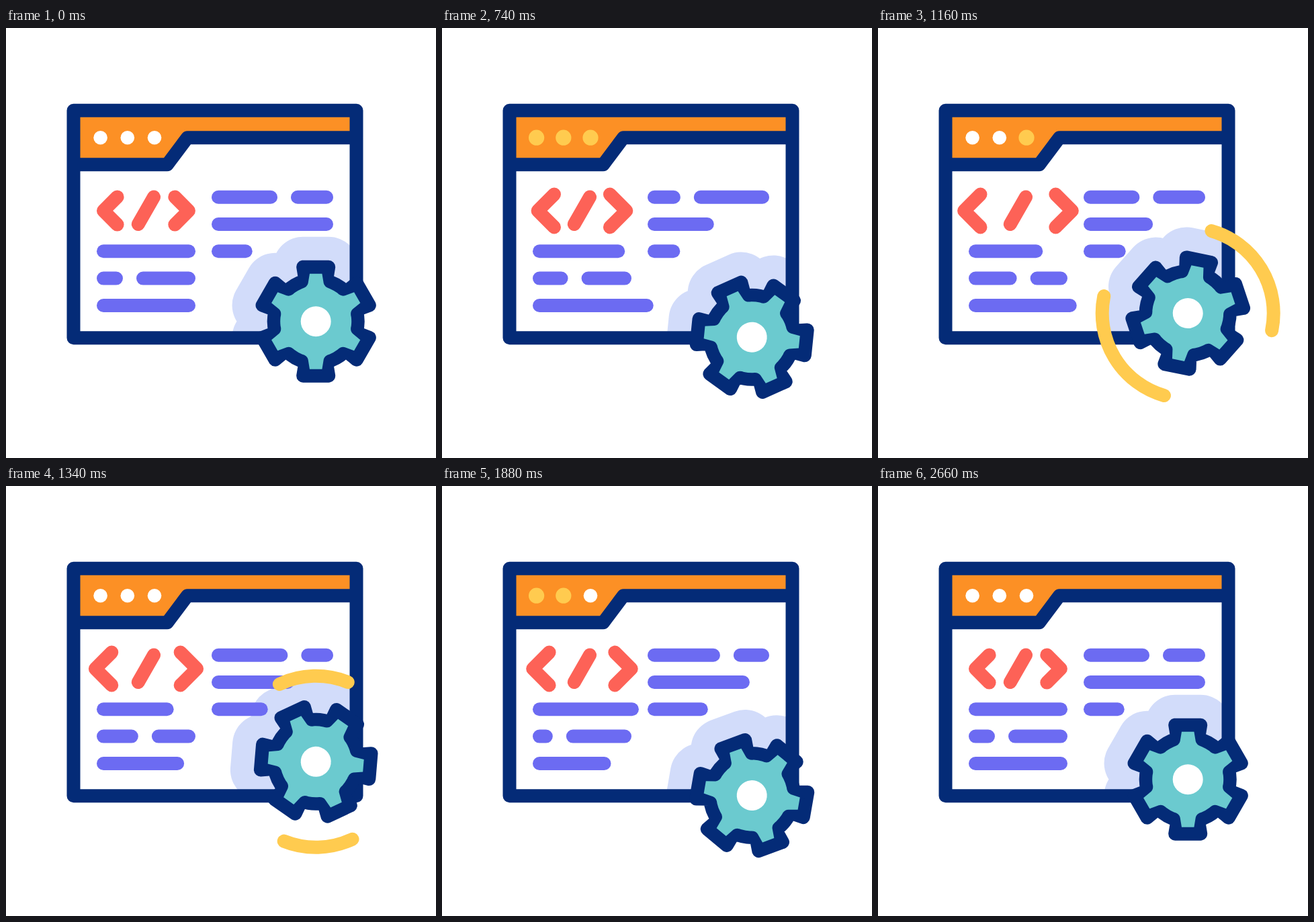
An HTML page for the animation above (3 s loop, 640 px wide and 640 px high).

```html
<!DOCTYPE html>
<html lang="en">
<head>
<meta charset="utf-8">
<title>Code window with gear</title>
<style>
  html, body { margin: 0; width: 100%; height: 100%; overflow: hidden; background: #fff; }
  svg { display: block; width: 100%; height: 100%; }
  .line { fill: none; stroke-width: 20; stroke-linecap: round; stroke-linejoin: round; }
  .navy { stroke: #042b77; }
  .bar { stroke: #6c6bf2; }
  .red { stroke: #fd6257; }
  .yellow { stroke: #ffcb4f; }
</style>
</head>
<body>
<svg viewBox="0 0 640 640">
  <defs>
    <clipPath id="inside"><rect x="105" y="128" width="411" height="328"/></clipPath>
    <path id="body"/>
  </defs>
  <g clip-path="url(#inside)">
    <use id="shadow" href="#body" fill="#d2dcfa" stroke="#d2dcfa" stroke-width="90" stroke-linejoin="round"/>
  </g>
  <path d="M100 123H522V163H270L240 203H100Z" fill="#fc9025"/>
  <path class="line navy" d="M100.5 122.7H521.5V461.2H100.5ZM100.5 203.2H240L270 163.2H521.5"/>
  <g id="dots"></g>
  <path class="line red" d="M220 251.5L196.8 292"/>
  <path class="line red" id="left"/>
  <path class="line red" id="right"/>
  <g id="bars"></g>
  <g id="gear">
    <path class="line yellow" id="arcs"/>
    <use href="#body" class="line navy" style="fill:#042b77"/>
    <path id="face" fill="#6bcacf"/>
    <circle r="22.5" fill="#fff"/>
  </g>
</svg>
<script>
const LOOP = 3000;
const byId = id => document.getElementById(id);
const clamp = x => Math.max(0, Math.min(1, x));
const sine = x => (1 - Math.cos(Math.PI * x)) / 2;

function add(parent, tag, attrs) {
  const el = document.createElementNS('http://www.w3.org/2000/svg', tag);
  for (const name in attrs) el.setAttribute(name, attrs[name]);
  return byId(parent).appendChild(el);
}

// Polar point, clockwise degrees from straight up
function polar(r, deg) {
  const a = deg * Math.PI / 180;
  return `${(r * Math.sin(a)).toFixed(2)} ${(-r * Math.cos(a)).toFixed(2)}`;
}

// Runs through [time, value] keys; blend shapes each step
function track(keys, t, blend) {
  const last = keys.length - 1;
  if (t <= keys[0][0]) return keys[0][1];
  if (t >= keys[last][0]) return keys[last][1];
  const i = keys.findIndex(key => key[0] > t) - 1;
  const [t0, v0] = keys[i], [t1, v1] = keys[i + 1];
  return blend(v0, v1, (t - t0) / (t1 - t0), i, t1 - t0);
}

const eased = (keys, t) => track(keys, t, (a, b, x) => a + (b - a) * sine(x));

// Flowing curve through the keys, at rest on both ends
function flowing(keys, t) {
  const slope = k => k === 0 || k === keys.length - 1 ? 0
    : (keys[k + 1][1] - keys[k - 1][1]) / (keys[k + 1][0] - keys[k - 1][0]);
  return track(keys, t, (a, b, x, i, span) => a + (b - a) * x * x * (3 - 2 * x)
    + span * x * (1 - x) * (slope(i) * (1 - x) - slope(i + 1) * x));
}

// Six-fold ring: one tooth path per 60 degrees, joined by arcs
function ring(r, tooth) {
  let d = '';
  for (let a = 0; a < 360; a += 60) {
    d += (a ? `A${r} ${r} 0 0 1 ` : 'M') + tooth((radius, deg) => polar(radius, a + deg));
  }
  return `${d}A${r} ${r} 0 0 1 ${d.slice(1).split(/[LQ]/)[0]}Z`;
}

byId('body').setAttribute('d', ring(62.5, p =>
  `${p(62.5, -14.5)}L${p(83.2, -13.2)}L${p(83.2, 13.2)}L${p(62.5, 14.5)}`));
byId('face').setAttribute('d', ring(53, p =>
  `${p(53, -23)}Q${p(52.5, -14)} ${p(58, -11.5)}L${p(71.6, -7.4)}`
  + `L${p(71.6, 7.4)}L${p(58, 11.5)}Q${p(52.5, 14)} ${p(53, 23)}`));

// Every bar end swings to one side, then the other, then rests
const rows = [
  { x: 316, y: 251.8, end: 394, swing: [-52, 26], start: 180, step: 660, far: 477 },
  { x: 316, y: 292, end: 477, swing: [-93, -41], start: 180, step: 720 },
  { x: 316, y: 332.2, end: 356.7, swing: [-14, 41], start: 180, step: 720 },
  { x: 145, y: 332.2, end: 272, swing: [-37, 11], start: 500, step: 700 },
  { x: 145, y: 372.6, end: 164, swing: [33, -9.5], start: 440, step: 680, far: 272 },
  { x: 145, y: 413, end: 272, swing: [37, -43], start: 180, step: 720 }
];
for (const row of rows) {
  row.el = add('bars', 'path', { class: 'line bar' });
  row.keys = [0, ...row.swing, 0].map((v, i) => [row.start + i * row.step, row.end + v]);
}

const dots = [0, 1, 2].map(i => {
  const place = { cx: 140.6 + i * 40.2, cy: 163.2 };
  add('dots', 'circle', { ...place, r: 10.3, fill: '#fff' });
  return add('dots', 'circle', { ...place, r: 11.6, fill: '#ffcb4f' });
});

const SPIN = [[180, 0], [500, -39.5], [1340, -205], [1880, -320], [2200, -347], [2600, -360]];
const BOB = [[180, 436.7], [790, 460.6], [1370, 410], [1890, 460.6], [2570, 436.7]];
const ARM = [[180, 20.6], [600, 24.4], [2200, 24.4], [2640, 20.6]];

function drawDots(t) {
  dots.forEach((dot, i) => {
    const glow = [240, 1620].map(start => {
      const on = start + i * 150;
      return Math.min(clamp((t - on) / 40), clamp((on + 740 - t) / 40));
    });
    dot.setAttribute('opacity', Math.max(...glow));
  });
}

function drawChevrons(t) {
  const arm = eased(ARM, t);
  const spread = t > 685 && t < 2585 ? 15 * sine((t - 685) / 475) : 0;
  const chevron = (id, x, side) => byId(id).setAttribute('d',
    `M${x - side * arm / 2} ${272 - arm}l${side * arm} ${arm}l${-side * arm} ${arm}`);
  chevron('left', 155.3 - spread, -1);
  chevron('right', 261.6 + spread, 1);
}

function drawArcs(t) {
  const trim = start => 90 * (1 - clamp((t - start) / 300)) ** 2;
  const head = trim(928), tail = trim(1258), r = 127.5;
  const arc = turn => `M${polar(r, tail + turn)}A${r} ${r} 0 0 0 ${polar(r, head + turn)}`;
  byId('arcs').setAttribute('d', tail - head > 0.1 ? arc(0) + arc(180) : '');
}

function draw(t) {
  for (const { el, x, y, keys, far } of rows) {
    const end = eased(keys, t);
    el.setAttribute('d', `M${x} ${y}H${end}` + (far ? `M${end + 40} ${y}H${far}` : ''));
  }
  const pose = `translate(461.2 ${eased(BOB, t)}) rotate(${flowing(SPIN, t)})`;
  byId('gear').setAttribute('transform', pose);
  byId('shadow').setAttribute('transform', pose);
  drawDots(t);
  drawChevrons(t);
  drawArcs(t);
}

function tick() {
  draw(performance.now() % LOOP);
  requestAnimationFrame(tick);
}
tick();
</script>
</body>
</html>
```
